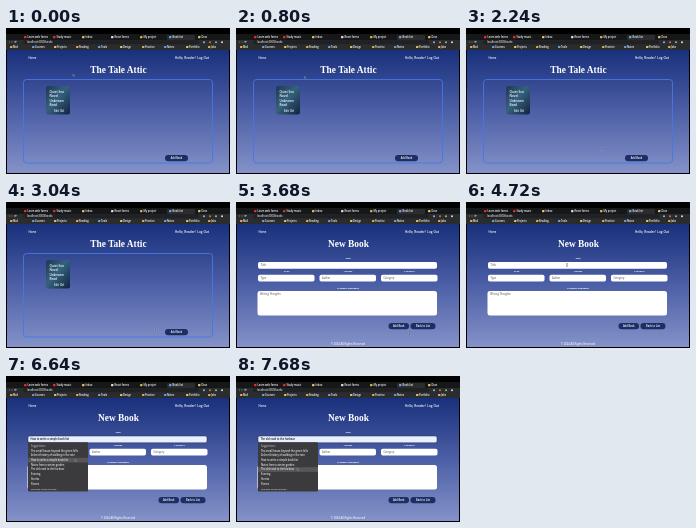
Write an HTML page that moves like this. It is 224 px wide and 146 px high and loops after 8000 ms.

```html
<!DOCTYPE html>
<html lang="en">
<head>
<meta charset="utf-8">
<title>Book list</title>
<style>
html, body { margin: 0; width: 100%; height: 100%; overflow: hidden; background: #000; }
svg { display: block; width: 100vw; height: 100vh; }
text { font-family: "Open Sans", sans-serif; font-weight: 600; fill: #fff; white-space: pre; }
.serif { font-family: "Liberation Serif", "Times New Roman", serif; }
</style>
</head>
<body>
<svg id="stage" viewBox="0 0 224 146" preserveAspectRatio="none">
  <defs>
    <linearGradient id="sky" x2="0" y2="1">
      <stop stop-color="#19307c"/><stop offset=".5" stop-color="#4d5fa6"/><stop offset="1" stop-color="#8492c8"/>
    </linearGradient>
    <linearGradient id="cover" x2="1" y2="1">
      <stop stop-color="#1c3854"/><stop offset=".45" stop-color="#35627f"/><stop offset="1" stop-color="#11233f"/>
    </linearGradient>
  </defs>
  <rect x="1" y="22" width="222" height="123" fill="url(#sky)"/>
  <g id="chrome"></g>
  <g id="nav"></g>
  <g id="home"></g>
  <g id="form"></g>
  <g id="menu"></g>
  <g id="pointer">
    <path id="arrow" d="M0 0V2.2L.5 1.8 .9 2.5 1.3 2.3 .9 1.6H1.6Z" fill="#111" stroke="#fff" stroke-width=".25"/>
    <path id="beam" d="M-.5-1.4H.5M0-1.4V1.4M-.5 1.4H.5" fill="none" stroke="#222" stroke-width=".5"/>
  </g>
</svg>
<script>
const $ = id => document.getElementById(id);
const rect = (x, y, w, h, fill, r = 0, extra = '') =>
  `<rect x="${x}" y="${y}" width="${w}" height="${h}" rx="${r}" fill="${fill}" ${extra}/>`;
const text = (x, y, size, str, fill = '#fff', extra = '') =>
  `<text x="${x}" y="${y}" font-size="${size}" style="fill:${fill}" ${extra}>${str}</text>`;
const mid = 'text-anchor="middle"';
const serif = 'class="serif" ' + mid;
const heading = str => `<g style="font-weight:700">${text(112.5, 45, 9.4, str, '#fff', serif + ' style="font-weight:700"')}</g>`;
const label = (x, y, str) => text(x, y, 2.9, str, '#fff', serif);
const button = (x, y, w, str) => rect(x, y, w, 6.2, '#1d2e65', 3) +
  text(x + w / 2, y + 4, 2.5, str, '#fff', mid);

// Browser window
const tabs = ['Learn web forms', 'Study music', 'Inbox', 'React forms', 'My project', 'Book list', 'Docs'];
const marks = ['Mail', 'Courses', 'Projects', 'Reading', 'Tools', 'Design', 'Practice', 'Notes', 'Portfolio', 'Jobs'];
const tints = ['#e0b050', '#6aa0e8', '#e6c468', '#ddd'];
$('chrome').innerHTML = rect(0, 0, 224, 6, '#000') + rect(0, 6, 224, 6, '#161719') + rect(0, 12, 224, 10, '#2b2c2e') +
  tabs.map((s, i) => {
    const x = 18 + i * 29;
    return (i == 5 ? rect(x - 2, 7, 28, 5, '#2b2c2e', 1) : '') +
      rect(x, 8, 2.4, 2.2, i < 2 ? '#f02a2a' : tints[i % 4], .4) +
      text(x + 3.5, 10, 2.5, s);
  }).join('') +
  text(3, 15.4, 3, '‹  ›  ⟳', '#ddd') + rect(17, 12.3, 176, 4, '#202124', 2) +
  text(21, 15.2, 2.5, 'localhost:3000/books', '#ddd') +
  ['#8ab4f8', '#d96b52', '#8cc37b', '#ddd'].map((c, i) => rect(197 + i * 6, 13.3, 2, 2, c, 1)).join('') +
  marks.map((s, i) => rect(4 + i * 22, 18, 2.4, 2, tints[i % 3], .4) +
    text(7 + i * 22, 20, 2.5, s)).join('');

$('nav').innerHTML = text(22.5, 30.6, 2.7, 'Home') +
  text(203, 31, 3.1, 'Hello, Reader!  Log Out', '#fff', 'text-anchor="end"');

// Book list page
$('home').innerHTML = heading('The Tale Attic') +
  rect(17.5, 51.5, 189, 83.5, 'none', 3, 'stroke="#4379e6" stroke-width=".9"') +
  rect(40, 58, 24, 28.5, 'url(#cover)', 2.5) +
  ['Quiet Sea', 'Novel', 'Unknown', 'Read'].map((s, i) =>
    text(43.5, 64.6 + i * 4.6, 3.1, s)).join('') +
  text(48, 84, 2.6, 'Edit  Del') + button(159, 127, 23, 'Add Book');

// New book page
const field = (x, y, w, str) => rect(x, y, w, 6.8, '#fff', 1.8) + text(x + 2.5, y + 4.3, 2.5, str, '#777');
$('form').innerHTML = heading('New Book') + label(112, 57, 'Title') +
  '<g id="titleField"></g>' +
  ['Type', 'Author', 'Category'].map((s, i) =>
    label(50.5 + i * 61.5, 70.3, s) + field(22 + i * 61.5, 72.8, 56.5, s)).join('') +
  label(112, 86.8, 'Writing Thoughts') + rect(21.5, 89, 179.5, 24.5, '#fff', 2.5) +
  text(24, 93.3, 2.5, 'Writing Thoughts', '#777') +
  button(152.5, 121, 20.5, 'Add Book') + button(174.5, 121, 25, 'Back to List') +
  text(112, 142.8, 2.7, '© 2024 All Rights Reserved', '#eef', mid);

// Suggestions under the title field
const options = ['Suggestions', 'The small house beyond the green hills', 'A short history of walking in the rain',
  'How to write a simple book list', 'Notes from a winter garden', 'The old road to the harbour',
  'Evening', 'Stories', 'Poems'];
const optionY = i => 67.7 + i * 4.7;

// Pointer stops: time, x, y
const stops = [[0, 67, 46], [720, 67, 46], [1520, 115, 117.5], [1600, 115, 117.5], [2480, 140, 121],
  [3040, 149, 126], [3280, 167, 130], [3520, 168, 130], [3680, 173, 131], [4480, 108, 73], [4720, 101, 63],
  [5120, 101, 63], [5280, 93, 62], [5840, 93, 62], [6640, 69, 83], [6720, 69, 83], [7600, 61, 92], [8000, 61, 92]];

function place(t) {
  const i = stops.findIndex(s => s[0] > t);
  const [a, b] = [stops[i - 1], stops[i]];
  const k = (t - a[0]) / (b[0] - a[0]), e = k * k * (3 - 2 * k);
  return [a[1] + (b[1] - a[1]) * e, a[2] + (b[2] - a[2]) * e];
}

const show = (id, on) => $(id).setAttribute('visibility', on ? 'visible' : 'hidden');

function draw(now) {
  const t = Math.floor(now % 8000 / 80) * 80;
  const [x, y] = place(t);
  const onForm = t >= 3440, open = t >= 5520;
  const over = open && x < 82 && y > 67 ? Math.floor((y - 67.7) / 4.7) : -1;
  const filled = over > 0;
  show('home', !onForm);
  show('form', onForm);
  show('menu', open);

  $('titleField').innerHTML = rect(22, 60, 179, 6.8, filled ? '#e8f0fe' : '#fff', 1.8,
    open ? 'stroke="#202a50" stroke-width=".5"' : '') +
    text(24.5, 64.4, 2.6, filled ? options[over] : 'Title', filled ? '#111' : '#777');
  $('menu').innerHTML = rect(22, 66.2, 60, 49.3, '#3b3b3e', .8) +
    (filled ? rect(22, optionY(over), 60, 4.7, '#57575b') : '') +
    options.map((s, i) => text(25, optionY(i) + 3.2, 2.5, s, i ? '#e2e2e2' : '#aaa')).join('') +
    text(25, 114, 2.4, 'Manage saved entries...', '#d0d0d0');

  const typing = onForm && y > 60 && y < 66.8 && x < 201;
  show('arrow', !typing);
  show('beam', typing);
  $('pointer').setAttribute('transform', `translate(${x} ${y})`);
}

const start = performance.now();
function tick() {
  draw(performance.now() - start);
  requestAnimationFrame(tick);
}
tick();
</script>
</body>
</html>
```
